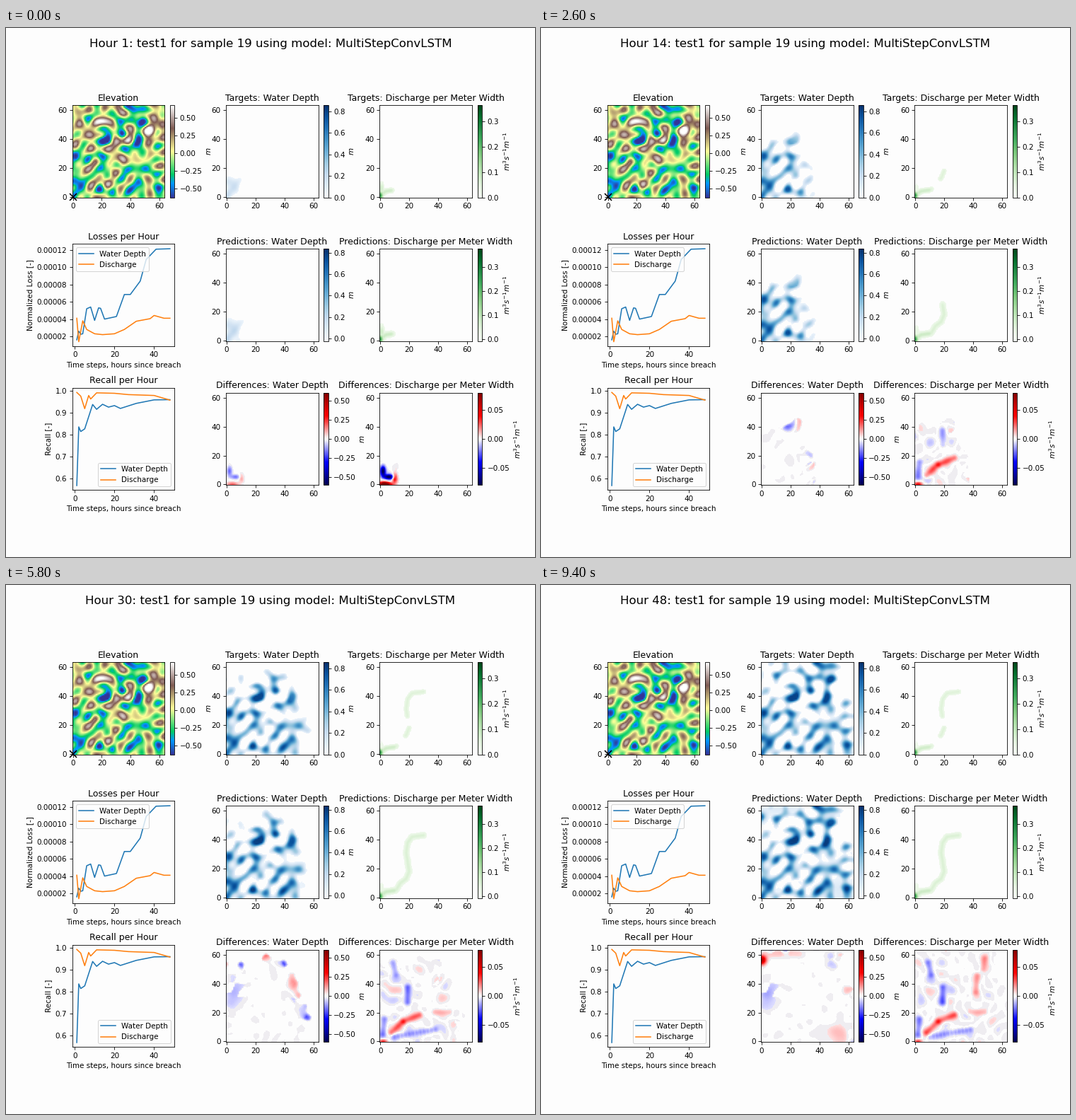
A matplotlib script for the animation above (9.6 s loop, 748 by 748 pixels).

```python
import numpy as np
import matplotlib.pyplot as plt
from matplotlib.animation import FuncAnimation
from matplotlib.cm import ScalarMappable
from matplotlib.colors import ListedColormap, Normalize, to_rgba

SIZE, DPI, HOURS, N = 748, 74.8, 48, 64
PAPER, FAINT = "#fdfdfd", "#efedf1"
Y, X = np.mgrid[0:N, 0:N].astype(float)

# Key points of the landscape, in cells
LOWS = [(1, 2), (2, 11), (3, 27), (20, 5), (27, 3), (19, 20), (19, 29), (19, 40),
        (25, 43), (35, 43), (36, 34), (42, 36), (10, 54), (33, 51), (41, 60),
        (48, 54), (38, 19), (50, 19), (42, 6), (61, 6)]
HIGHS = [(4, 51), (12, 43), (12, 34), (21, 51), (34, 59), (56, 54), (55, 45),
         (35, 25), (11, 20), (25, 34), (24, 10), (36, 39)]
CHANNEL = [(0, 1), (4, 4), (11, 5), (14, 10), (18, 13), (20, 18), (19, 25),
           (18, 31), (19, 38), (22, 42), (30, 43)]
DRY = [(2.1, 3.9), (5, 6.2)]  # stretches of the channel that run dry

# Lasting errors of the predicted discharge: start, end, strength
STREAKS = [
    ((8, 6), (15, 13), .024), ((17, 14), (27, 18), .026), ((10, 3), (38, 8), -.017),
    ((2, 5), (3, 15), -.02), ((19, 27), (19, 37), -.024), ((9, 54), (11, 46), -.02),
    ((42, 34), (43, 45), .016), ((47, 50), (48, 57), .014), ((38, 20), (48, 20), .012),
]


def bump(x, y, sx, sy=None):
    return np.exp(-.5 * (((X - x) / sx) ** 2 + ((Y - y) / (sy or sx)) ** 2))


def ripples(seed, slow, fast, drift=0, waves=40):
    """Random waves of unit variance with wave numbers from slow to fast."""
    rng = np.random.default_rng(seed)
    angle, phase = rng.uniform(0, 2 * np.pi, (2, waves))
    k = rng.uniform(slow, fast, waves)
    field = sum(np.cos(q * (np.cos(a) * X + np.sin(a) * Y) + p + drift)
                for q, a, p in zip(k, angle, phase))
    return field / np.sqrt(waves / 2)


def landscape():
    """Random hills, bent so that they pass through the key points."""
    base = .2 * ripples(5, .5, .75)
    points = np.array(LOWS + HIGHS)
    height = np.repeat([-.5, .52], [len(LOWS), len(HIGHS)])
    bumps = np.array([bump(x, y, 2.7) for x, y in points])
    rows, cols = points[:, 1], points[:, 0]
    weights = np.linalg.solve(bumps[:, rows, cols].T, height - base[rows, cols])
    return np.clip(base + np.tensordot(weights, bumps, 1), -.63, .68)


def flood_time(height):
    """Hour at which water from the corner reaches each cell; low ground is fast."""
    cost = np.exp(1.8 * height)
    dist = np.full((N, N), 1e3)
    dist[0, 0] = 0
    steps = [(i, j) for i in (0, 1, 2) for j in (0, 1, 2) if (i, j) != (1, 1)]
    for _ in range(180):
        wide = np.pad(dist, 1, constant_values=1e3)
        for i, j in steps:
            near = wide[i:i + N, j:j + N] + cost * np.hypot(i - 1, j - 1)
            dist = np.minimum(dist, near)
    return HOURS * (dist / np.percentile(dist[height < 0], 98)) ** 2 - .5


ELEVATION = landscape()
ARRIVAL = flood_time(ELEVATION)
LAG = .09 * np.clip(ARRIVAL, 0, 40) * ripples(8, .15, .4)
U = np.linspace(0, len(CHANNEL) - 1, 101)
STREAM = np.array([bump(x, y, 1.3) for x, y in zip(
    *(np.interp(U, range(len(CHANNEL)), c) for c in zip(*CHANNEL)))])
STREAK_MAPS = [(amp * np.max([bump(x, y, 1.6) for x, y in
                              np.linspace(a, b, 12)], axis=0), ARRIVAL[b[1], b[0]])
               for a, b, amp in STREAKS]
# Opening error: too little water up the edges, too much along the bottom
OPENING = (bump(4, 0, 3, 1) + .7 * bump(10, 4, 1.3, 2.2)
           - bump(2, 9, 1.2, 2.5) - bump(6, 5, 2.4, 1.1))


def ramp(hour, start, length=6):
    return np.clip((hour - start) / length, 0, 1)


def water(hour, arrival):
    growth = 1 - np.exp(-np.clip(hour - arrival, 0, None) / 4)
    return growth * np.clip(.1 - 1.1 * ELEVATION, 0, .85)


def stream(hour, dry=()):
    amp = np.where(U < 1.9, .08, .056) * ramp(1.8 + .34 * (hour - 1), U, .25)
    for a, b in dry:
        if hour >= 12:
            amp[(U > a) & (U < b)] = 0
    flow = (amp[:, None, None] * STREAM).max(0)
    source = .27 * bump(0, 1, 1.3, 1.8)
    side = (.03 + .06 * np.exp(-hour / 6)) * bump(1, 6, 1.2, 3.2)
    return np.maximum(flow, np.maximum(source, side))


def fields(hour):
    depth = water(hour, ARRIVAL)
    wet = ARRIVAL < hour
    opening = np.exp(-(hour - 1) / 3) * OPENING
    bias = (-.1 * bump(5, 33, 4.5, 7) * ramp(hour, 20)
            + .08 * bump(54, 5, 9, 5) * ramp(hour, 32)
            + .08 * bump(15, 61, 8, 2.5) * ramp(hour, 32)
            + .6 * bump(0, 56, 2.2) * ramp(hour, 36, 14))
    noise = .01 * wet * ripples(7, .3, .7, .06 * hour)
    guess = np.clip(water(hour, ARRIVAL + LAG) + bias + noise, 0, .838)
    streaks = sum(m * ramp(hour, start) for m, start in STREAK_MAPS)
    flow_error = (.08 * opening + streaks + .04 * bump(2, 0, 2, 1)
                  + .003 * wet * ripples(11, .3, .7, .06 * hour))
    return (depth, stream(hour, DRY), guess, stream(hour),
            guess - depth + .18 * opening, flow_error)


def pale_start(name):
    colors = plt.get_cmap(name)(np.linspace(0, 1, 256))
    colors[:14] = to_rgba(PAPER)
    return ListedColormap(colors)


def pale_middle(name):
    colors = plt.get_cmap(name)(np.linspace(0, 1, 256))
    away = np.abs(np.linspace(-1, 1, 256))
    colors[away < .06] = to_rgba(FAINT)
    colors[away < .022] = to_rgba(PAPER)
    return ListedColormap(colors)


plt.rcParams.update({"font.family": "DejaVu Sans", "font.size": 10,
                     "axes.facecolor": PAPER, "figure.facecolor": PAPER})
fig = plt.figure(figsize=(SIZE / DPI, SIZE / DPI), dpi=DPI)

# Layout in pixels, measured from the top left
CELL, BAR_GAP = 144.9, .1 * DPI
SIDE = (CELL - BAR_GAP) / 1.05
COLS = [93.5 + 217.4 * i for i in range(3)]
ROWS = [174.46 + 203.29 * i for i in range(3)]


def panel(left, middle, width, height):
    return fig.add_axes([left / SIZE, 1 - (middle + height / 2) / SIZE,
                         width / SIZE, height / SIZE])


def map_panel(row, col, title, cmap, lo, hi, ticks, unit, bar_cmap=None):
    ax = panel(COLS[col], ROWS[row], SIDE, SIDE)
    image = ax.imshow(np.zeros((N, N)), origin="lower", cmap=cmap, vmin=lo,
                      vmax=hi, aspect="auto")
    ax.set(title=title, xticks=range(0, 61, 20), yticks=range(0, 61, 20))
    cax = panel(COLS[col] + SIDE + BAR_GAP, ROWS[row], .05 * SIDE, SIDE)
    bar = fig.colorbar(ScalarMappable(Normalize(lo, hi), bar_cmap or cmap),
                       cax=cax, ticks=ticks)
    bar.set_label(unit)
    return ax, image


def line_panel(row, title, ylabel, ylim, curves, loc):
    ax = panel(COLS[0], ROWS[row], CELL, CELL)
    hours = np.arange(1, HOURS + 1)
    for label, knots in zip(("Water Depth", "Discharge"), curves):
        ax.plot(hours, np.interp(hours, *zip(*knots)), label=label)
    ax.set(title=title, xlabel="Time steps, hours since breach", ylabel=ylabel,
           xlim=(-1.35, 50.35), ylim=ylim, xticks=(0, 20, 40))
    ax.legend(loc=loc)
    return ax


METER, FLOW = "$m$", "$m^3s^{-1}m^{-1}$"
BLUE, GREEN, DIFF = pale_start("Blues"), pale_start("Greens"), pale_middle("seismic")
TENTHS, FIFTHS = [0, .1, .2, .3], [0, .2, .4, .6, .8]
QUARTERS = [-.5, -.25, 0, .25, .5]

ground, relief = map_panel(0, 0, "Elevation", "terrain", -.63, .68, QUARTERS, METER)
relief.set_data(ELEVATION)
ground.plot(0, 0, "x", color="black", ms=10, mew=1.5, clip_on=False, zorder=5)
ground.set(xlim=(-.5, 63.5), ylim=(-.5, 63.5))

images = [image for _, image in (
    map_panel(0, 1, "Targets: Water Depth", BLUE, 0, .859, FIFTHS, METER, "Blues"),
    map_panel(0, 2, "Targets: Discharge per Meter Width", GREEN, 0, .364,
              TENTHS, FLOW, "Greens"),
    map_panel(1, 1, "Predictions: Water Depth", BLUE, -.03, .838, FIFTHS, METER,
              "Blues"),
    map_panel(1, 2, "Predictions: Discharge per Meter Width", GREEN, -.01, .375,
              TENTHS, FLOW, "Greens"),
    map_panel(2, 1, "Differences: Water Depth", DIFF, -.607, .607, QUARTERS,
              METER, "seismic"),
    map_panel(2, 2, "Differences: Discharge per Meter Width", DIFF, -.079, .079,
              [-.05, 0, .05], FLOW, "seismic"),
)]

# Turning points of the curves: hour, value
loss_depth = [(1, 1.6), (2, 2.6), (3, 2.25), (4, 2.3), (6, 5.2), (8, 5.4), (10, 3.85),
              (12, 5.3), (13, 5.25), (15, 4), (21, 4.3), (25, 6.85), (28, 6.85),
              (33, 8.4), (36, 10.9), (41, 12.1), (48, 12.15)]
loss_flow = [(1, 4.1), (2, 1.38), (4, 3.8), (6, 2.8), (10, 2.3), (14, 2.2), (20, 2.3),
             (25, 2.8), (31, 3.75), (38, 4.05), (40, 4.42), (45, 4.1), (48, 4.1)]
recall_depth = [(1, .568), (2, .835), (3, .814), (5, .826), (9, .937), (11, .915),
                (14, .938), (17, .925), (20, .932), (23, .919), (31, .942),
                (40, .958), (48, .959)]
recall_flow = [(1, .992), (3, .975), (5, .918), (7, .978), (8, .962), (11, .99),
               (20, .988), (27, .982), (40, .978), (48, .957)]

losses = line_panel(1, "Losses per Hour", "Normalized Loss [-]", (.838, 12.71),
                    (loss_depth, loss_flow), "upper left")
losses.set_yticks(range(2, 13, 2), [f"{v * 1e-5:.5f}" for v in range(2, 13, 2)])
recall = line_panel(2, "Recall per Hour", "Recall [-]", (.547, 1.0135),
                    (recall_depth, recall_flow), "lower right")
recall.set_yticks([.6, .7, .8, .9, 1])

heading = fig.suptitle("", fontsize=16)


def update(frame):
    hour = frame + 1
    heading.set_text(f"Hour {hour}: test1 for sample 19 using model: MultiStepConvLSTM")
    for image, field in zip(images, fields(hour)):
        image.set_data(field)
    return [heading, *images]


anim = FuncAnimation(fig, update, frames=HOURS, interval=200, repeat=True,
                     repeat_delay=0, init_func=lambda: update(0), blit=False)
plt.show()
```
